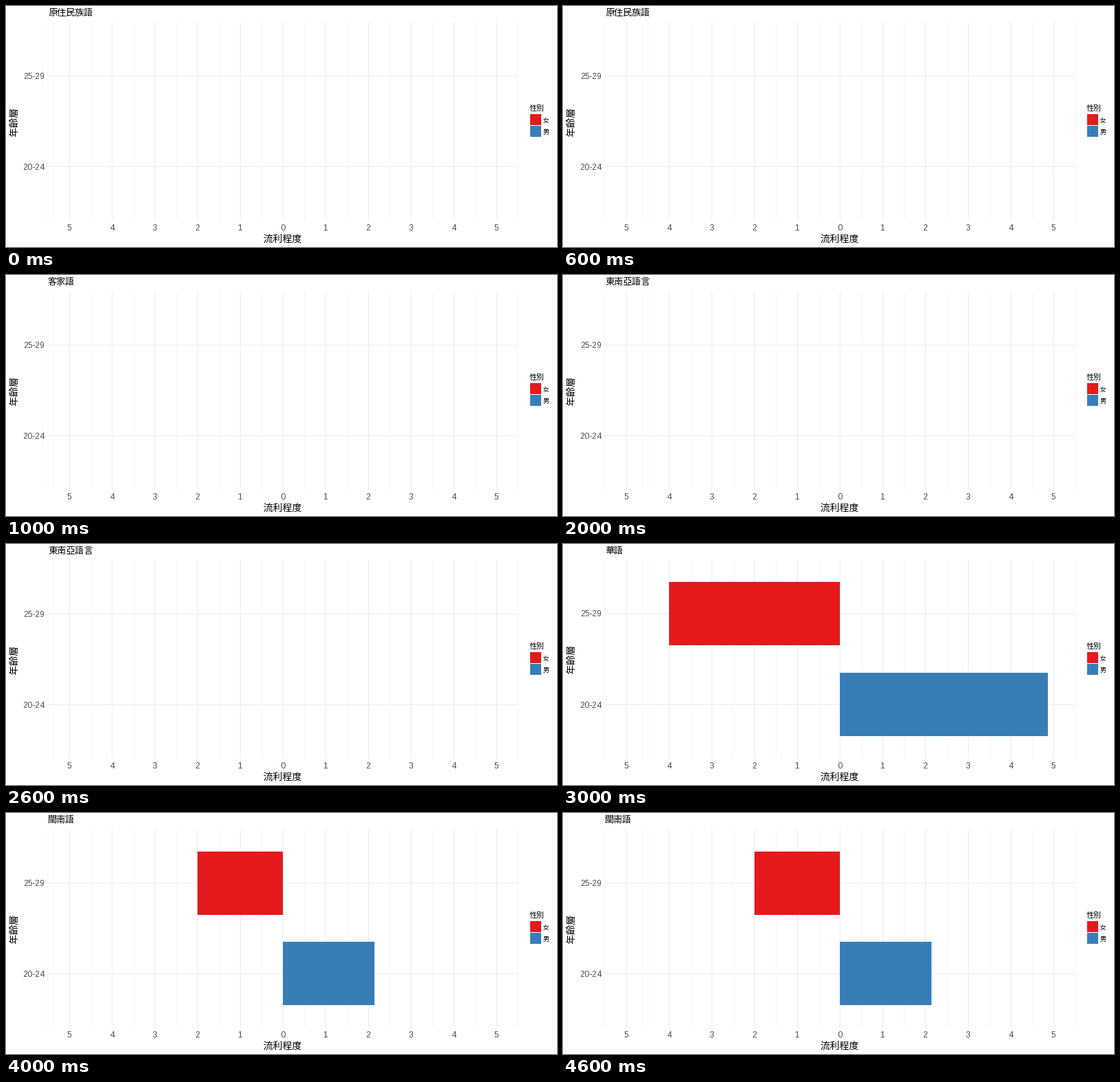
Write a matplotlib script that moves like this. It is 800 by 350 pixels and loops after 5 s.

```python
import matplotlib.pyplot as plt
from matplotlib.animation import FuncAnimation
from matplotlib.patches import Rectangle

W, H, DPI = 800, 350, 100
PT = 72 / DPI
RED, BLUE = "#E41A1C", "#377EB8"
GRID, TICK = "#EBEBEB", "#4D4D4D"
LEFT, RIGHT, BOTTOM = 61, 743.6, 312.3
X0, UNIT = 402.3, 62.05

# language, female score, male score, top of the panel
SCENES = [
    ("原住民族語", 0, 0, 23.0),
    ("客家語", 0, 0, 23.0),
    ("東南亞語言", 0, 0, 23.0),
    ("華語", 4, 4.87, 22.2),
    ("閩南語", 2, 2.14, 23.0),
]

plt.rcParams["text.hinting_factor"] = 1
fig = plt.figure(figsize=(W / DPI, H / DPI), dpi=DPI, facecolor="white")
ax = fig.add_axes([0, 0, 1, 1])


def text(x, y, s, px, color="black", font="Noto Sans CJK JP", **kw):
    ax.text(x, y, s, fontsize=px * PT, color=color, family=font,
            va="baseline", **kw)


def tick(x, y, s, ha):
    text(x, y, s, 12, TICK, "Liberation Sans", ha=ha)


def line(xs, ys, px):
    ax.plot(xs, ys, color=GRID, lw=px * PT, solid_capstyle="butt", snap=False)


def box(x, y, w, h, color):
    ax.add_patch(Rectangle((x, y), w, h, fc=color, ec="none", lw=0, zorder=3))


def draw(i):
    title, female, male, top = SCENES[i]
    ax.clear()
    ax.set(xlim=(0, W), ylim=(H, 0))
    ax.axis("off")

    # two age groups with 0.6 of a step beyond each
    step = (BOTTOM - top) / 2.2
    y_low = BOTTOM - 0.6 * step
    y_high = y_low - step

    for k in range(12):
        x = X0 + (k - 5.5) * UNIT
        line([x, x], [top, BOTTOM], 0.53)
    for y in (y_high, y_low):
        line([LEFT, RIGHT], [y, y], 1.07)
    for k in range(-5, 6):
        x = X0 + k * UNIT
        line([x, x], [top, BOTTOM], 1.07)
        tick(x - 0.6, 326, str(abs(k)), "center")

    bar = 0.7 * step
    if female:
        box(X0 - female * UNIT, y_high - bar / 2, female * UNIT, bar, RED)
    if male:
        box(X0, y_low - bar / 2, male * UNIT, bar, BLUE)

    tick(56, round(y_high + 4.1), "25-29", "right")
    tick(56, 238, "20-24", "right")

    text(61, 14, title, 13.2)
    text(402, 343, "流利程度", 14, ha="center")
    text(16, round(BOTTOM / 2 + top / 2), "年齡層", 14, ha="center",
         rotation=90, rotation_mode="anchor")

    text(760, 152, "性別", 11)
    for y, name, color in ((157, "女", RED), (174, "男", BLUE)):
        box(761, y, 16, 16, color)
        text(780, y + 12, name, 8.8)
    return []


anim = FuncAnimation(fig, draw, frames=len(SCENES), interval=1000,
                     init_func=lambda: draw(0), repeat=True, repeat_delay=0)
plt.show()
```
